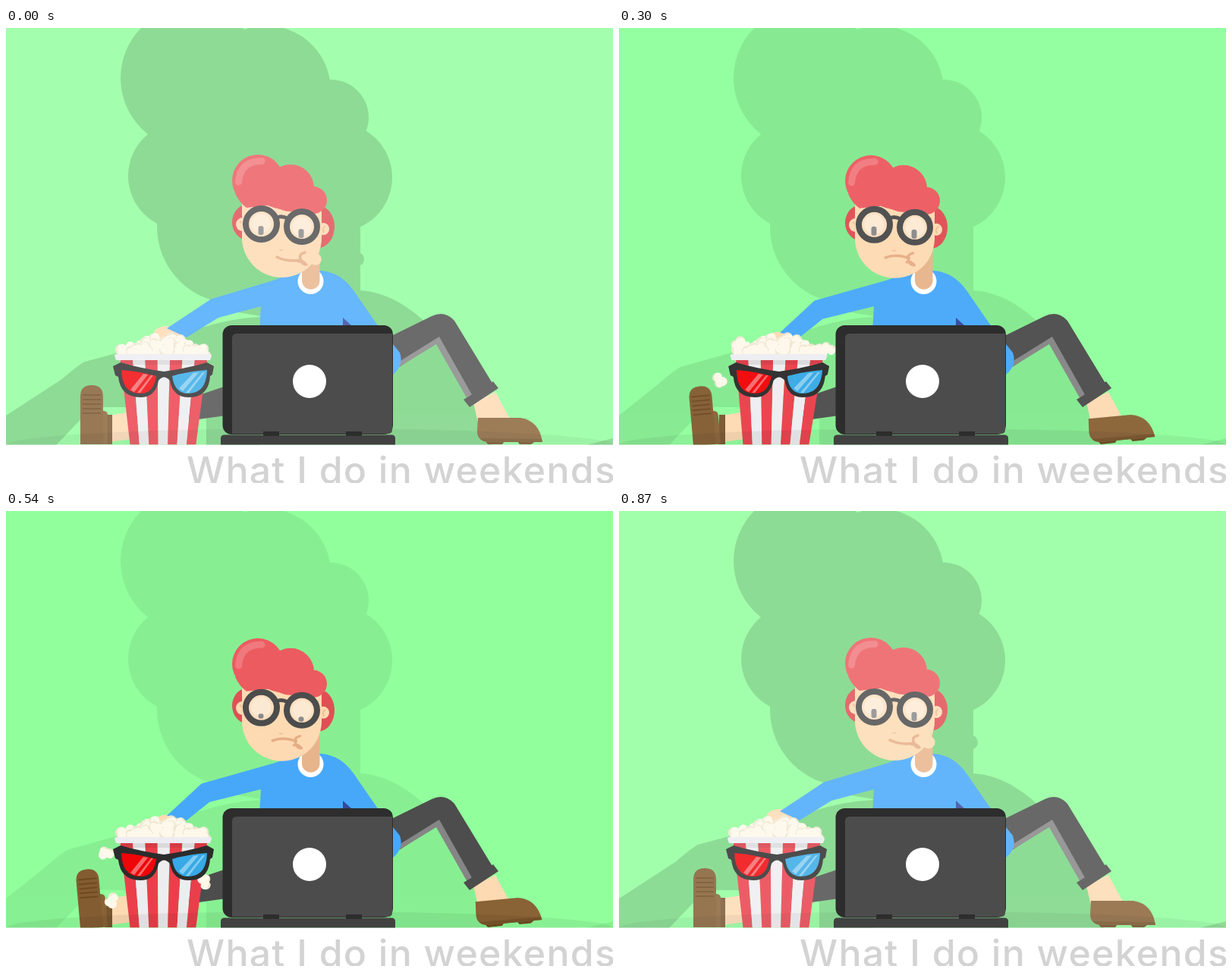
Recreate the animation shown at these times as an HTML page. Size 800 by 600 pixels, loop 0.9 s.

```html
<!DOCTYPE html>
<html lang="en">
<head>
<meta charset="utf-8">
<title>Weekend</title>
<style>
html, body { margin: 0; width: 100%; height: 100%; overflow: hidden; background: #fff; }
svg { display: block; width: 800px; height: 600px; }
.shirt { fill: #47a8fa; }
.skin { fill: #fddab2; }
.hair { fill: #ec5b60; }
.back { fill: #e04f54; }
.brown { fill: #896236; }
.pants { fill: #4d4d4d; }
.ring { fill: #fbdfbf; stroke: #4c4c4c; stroke-width: 8; }
.mouth { fill: none; stroke: #e6ad86; stroke-width: 3.5; stroke-linecap: round; stroke-linejoin: round; }
</style>
</head>
<body>
<svg viewBox="0 0 800 600">
  <defs>
    <clipPath id="wall"><rect width="800" height="549.5"/></clipPath>
    <g id="corn">
      <g fill="#efe7d2">
        <circle cx="-4" cy="3" r="6"/><circle cx="4" cy="2" r="6"/>
      </g>
      <g fill="#fdf8ea">
        <circle cx="-5" cy="1" r="5"/><circle cx="3" cy="-3" r="6"/>
        <circle cx="5" cy="2" r="4"/><circle cx="-1" cy="2" r="4.5"/>
      </g>
    </g>
  </defs>
  <rect width="800" height="600" fill="#fff"/>

  <g clip-path="url(#wall)">
    <rect width="800" height="550" fill="#90ff9c"/>
    <g id="shade">
      <circle cx="245" cy="66" r="94"/><circle cx="343" cy="82" r="85"/>
      <circle cx="428" cy="118" r="50"/><circle cx="232" cy="195" r="71"/>
      <circle cx="437" cy="197" r="72"/><circle cx="300" cy="262" r="101"/>
      <path d="M232 140H437L467 220V346C502 348 534 368 562 397L585 420L640 550H500V425H335V380L300 374L262 352L232 220Z"/>
      <circle id="cheekShade" cx="463" cy="305" r="10"/>
      <path id="armShade"/>
      <path d="M765 550L800 541V550Z"/>
    </g>

    <!-- legs -->
    <path class="pants" d="M240 489L290 472V511L240 518Z"/>
    <path class="skin" d="M134 511L168 506L166 542L136 546Z"/>
    <path d="M132 510H140V549H130Z" fill="#785630"/>
    <g id="foot">
      <path class="brown" d="M124 505Q134 504 134 510V549H120Z"/>
      <path d="M98 549V486Q98 471 113 471Q128 471 128 486V549Z" fill="#835c32"/>
      <path d="M101 484H125M101 490H125M101 496H125M101 502H125M101 508H125" stroke="#6d4a20" stroke-width="2"/>
    </g>
    <path class="skin" d="M616 494L645 480L664 515L622 520Z"/>
    <path class="pants" d="M500 410L561 380Q578 372 591 386L642 470L614 490L571 411L520 446L500 450Z"/>
    <path d="M518 447V440L571 407L616 487L609 491L567 417Z" fill="#858585"/>
    <path class="pants" d="M603 490L642 466L649 475L611 500Z"/>
    <g id="shoe">
      <path d="M630 542H702L692 549H677L674 545H657L654 549H635Z" fill="#6e4b22"/>
      <path class="brown" d="M622 514H678Q703 518 707 546H637Q621 545 621 532Z"/>
      <path d="M624 541Q628 546 637 546H707L706 542Z" fill="#79552a"/>
    </g>

    <!-- body -->
    <ellipse id="hand" class="skin" cx="212" cy="402" rx="17" ry="9"/>
    <path id="arm" class="shirt"/>
    <path class="shirt" d="M334 400L336 366L350 334L385 320H415Q441 322 458 346L489 391L519 428Q525 446 509 458L470 430V400Z"/>
    <path d="M444 382V393H456Z" fill="#34489c"/>
    <circle cx="401.500" cy="334" r="17" fill="#fff"/>
    <path d="M390 280H413.500V333A11.700 11.700 0 0 1 390 333Z" fill="#e8b48b"/>

    <g id="head">
      <ellipse class="back" cx="320" cy="256" rx="22" ry="24"/>
      <ellipse class="back" cx="411" cy="262" rx="22" ry="28"/>
      <circle class="skin" cx="312" cy="259" r="9"/><circle class="skin" cx="418" cy="265" r="8"/>
      <path d="M308 255Q314 258 311 265M421 261Q416 264 419 270" fill="none" stroke="#eebd91" stroke-width="2"/>
      <path class="skin" d="M311 225H416V276.500A52.500 52.500 0 0 1 311 276.500Z"/>
      <path class="hair" d="M302 218Q308 231 317 237L345 234Q362 241 378 240L408 244L400 212H340Z"/>
      <circle class="hair" cx="375" cy="211" r="31"/>
      <circle class="hair" cx="405" cy="227" r="18"/>
      <circle class="hair" cx="332" cy="201" r="34"/>
      <path d="M306.500 203Q309 175 337 175.500" fill="none" stroke="#f0797d" stroke-width="9" stroke-linecap="round"/>
      <circle class="ring" cx="336.500" cy="258.500" r="20.500"/>
      <circle class="ring" cx="390" cy="262" r="20"/>
      <circle cx="336" cy="258" r="13" fill="#fce9d3"/><circle cx="390" cy="262" r="13" fill="#fce9d3"/>
      <path d="M357 250Q363 247 371 251" fill="none" stroke="#4c4c4c" stroke-width="5"/>
      <g fill="#8a8a8a">
        <rect class="pupil" x="332.500" width="7" rx="3"/>
        <rect class="pupil" x="385.500" width="7" rx="3"/>
      </g>
      <path d="M360 292Q363 294 365 292" fill="none" stroke="#eebd91" stroke-width="1.500"/>
      <circle id="cheek" class="skin" cx="408" cy="305"/>
      <path id="mouth" class="mouth"/>
      <path id="hook" class="mouth" d="M394 296Q386 298 388 304Q389 312 396 312Q391 306 386 308"/>
    </g>

    <!-- bucket -->
    <g id="bucket"><g id="heap"></g><g id="stripes"></g>
      <path d="M143 432Q143 430 146 430H268Q271 430 271 432L269 438H145Z" fill="#ececf1"/>
      <path d="M151 438H265L264 444H152Z" opacity=".08"/>
    </g>
    <g id="bits"></g>
    <g id="shades">
      <path fill="#2c2c2c" d="M141 446L151 441Q178 449 208 453Q238 449 265 441L274 446L272 457L269 459Q267 487 241 487Q220 487 216 465Q208 456 201 465Q197 487 177 487Q151 487 148 460L144 458Z"/>
      <path fill="#f00508" d="M152 451Q177 453 198 459Q195 482 177 482Q153 482 152 451Z"/>
      <path fill="#36a9e6" d="M265 451Q240 453 219 459Q222 482 240 482Q264 482 265 451Z"/>
      <path fill="#fff" opacity=".4" d="M181 456L187 457L169 480L164 477ZM191 458H194L177 481H173ZM247 455L254 454L233 479L228 475ZM259 454H262L241 481H237Z"/>
    </g>
    <ellipse cx="400" cy="550" rx="400" ry="22" opacity=".06"/>
    <rect id="glow" width="800" height="550" fill="#fff"/>
  </g>

  <!-- laptop -->
  <rect x="285.500" y="392" width="224.500" height="144" rx="12" fill="#2d2d2d"/>
  <path d="M298 409Q298 403 304 403H509V530Q509 535 503 535H298Z" fill="#4c4c4c"/>
  <path d="M283 549.500V541Q283 536.500 288 536.500H508Q513 536.500 513 541V549.500Z" fill="#414141"/>
  <path d="M339 532H360V538H339ZM448 532H469V538H448Z" fill="#2d2d2d"/>
  <circle cx="400" cy="466" r="22" fill="#fff"/>

  <text x="238" y="601" font-family="Inter, 'Open Sans', sans-serif" font-size="50" font-weight="500" letter-spacing="1.25" fill="#d3d3d3">What I do in weekends</text>
</svg>
<script>
const LOOP = 900, STEP = 30;
const $ = id => document.getElementById(id);
const set = (el, attrs) => { for (const k in attrs) el.setAttribute(k, attrs[k]); };
const clamp = v => Math.max(0, Math.min(1, v));
const mix = (a, b, p) => a + (b - a) * p;

function add(parent, name, attrs) {
  const el = document.createElementNS('http://www.w3.org/2000/svg', name);
  set(el, attrs);
  return parent.appendChild(el);
}

// Each key is [time, value, ...]
function track(keys, t) {
  if (t <= keys[0][0]) return keys[0].slice(1);
  for (let i = 1; i < keys.length; i++) {
    const a = keys[i - 1], b = keys[i];
    if (t <= b[0]) return a.slice(1).map((v, j) => mix(v, b[j + 1], (t - a[0]) / (b[0] - a[0])));
  }
  return keys[keys.length - 1].slice(1);
}

for (let i = 0; i < 7; i++) {
  const top = 150.5 + i * 16.4, low = 163.5 + i * 12.4;
  add($('stripes'), 'path', {
    d: `M${top} 436H${top + 16.4}L${low + 12.4} 549.5H${low}Z`,
    fill: i % 2 ? '#ededf0' : '#ea3f4a'
  });
}

const corn = (parent, x, y, turn = 0, size = 1) => add(parent, 'use', {
  href: '#corn', transform: `translate(${x} ${y}) rotate(${turn}) scale(${size})`
});
for (let row = 0; row < 3; row++) {
  const n = 4 + row * 2;
  for (let i = 0; i < n; i++) {
    const u = i / (n - 1) * 2 - 1;
    corn($('heap'), 207 + u * (24 + row * 14), 413 + row * 6 + 3 * u * u, i * 77 + row * 40, 1.15);
  }
}

const paths = [
  [[60, 152, 424], [180, 134, 437], [300, 133, 464], [420, 134, 491], [540, 140, 514], [750, 142, 535], [870, 142, 541]],
  [[60, 168, 419], [300, 158, 417], [420, 137, 429], [540, 132, 452], [750, 140, 507], [870, 142, 530]],
  [[60, 256, 420], [180, 267, 420], [300, 275, 424], [420, 272, 452], [540, 261, 489], [750, 252, 537], [870, 250, 543]]
];
const bits = paths.map(() => corn($('bits'), 0, 0));
const light = [[0, 1], [180, .75], [300, .2], [420, .9], [540, 0], [750, .2], [870, .9]];

function draw(t) {
  const p = (1 + Math.cos(2 * Math.PI * (t - 420) / LOOP)) / 2;

  const [lit] = track(light, t);
  set($('glow'), { opacity: .17 * lit });
  set($('shade'), { opacity: .06 + .11 * lit });

  const ex = mix(272, 258, p), ey = mix(357, 359, p), wy = mix(396, 403, p);
  set($('arm'), {
    d: `M212 ${wy}L${ex - 4} ${ey + 2}Q${ex - 2} ${ey} ${ex} ${ey}L362 330L400 340L340 366L${ex + 8} ${ey + 25}L238 408Z`
  });
  set($('hand'), { cy: 402 + 9 * p });
  const sx = mix(104, 77, p), sy = mix(440, 448, p);
  set($('armShade'), {
    d: `M0 511L${sx - 30} ${sy + 23}Q${sx - 8} ${sy + 4} ${sx} ${sy}L145 429L240 401Q290 383 335 381V550H264V500H114L66 550H0Z`
  });

  set($('foot'), { transform: `rotate(${-6 * p} 126 549)` });
  set($('shoe'), { transform: `rotate(${-6.5 * p} 634 549)` });

  set($('head'), { transform: `translate(0 ${p})` });
  set($('mouth'), {
    d: `M${mix(357, 350, p)} 302Q${mix(371, 363, p)} ${mix(309, 294, p)} ${mix(389, 381, p)} ${mix(306, 302, p)}`
  });
  set($('hook'), { transform: `translate(${-8 * p} 0)` });
  const puff = clamp(1 - p / .12);
  set($('cheek'), { r: 8.5 * puff });
  set($('cheekShade'), { r: 10 * puff });

  const shut = clamp(1 - Math.abs(t - 570) / 90);
  document.querySelectorAll('.pupil').forEach((el, i) => {
    const h = 12 - 8 * shut;
    set(el, { y: 273 + i * 4 - h, height: h });
  });

  const lean = t < 400 ? -5 * Math.sin(Math.PI * t / 400) / 115 : 0;
  const skew = `matrix(1 0 ${lean} 1 ${-549 * lean} 0)`;
  set($('bucket'), { transform: skew });
  set($('shades'), { transform: skew });

  bits.forEach((el, i) => {
    const [x, y] = track(paths[i], t);
    set(el, {
      transform: `translate(${x} ${y}) rotate(${t / 4 + i * 70})`,
      opacity: t < 60 ? 0 : clamp((850 - t) / 210)
    });
  });
}

const start = performance.now();
function tick() {
  const t = (performance.now() - start) % LOOP;
  draw(Math.floor(t / STEP) * STEP);
  requestAnimationFrame(tick);
}
tick();
</script>
</body>
</html>
```
